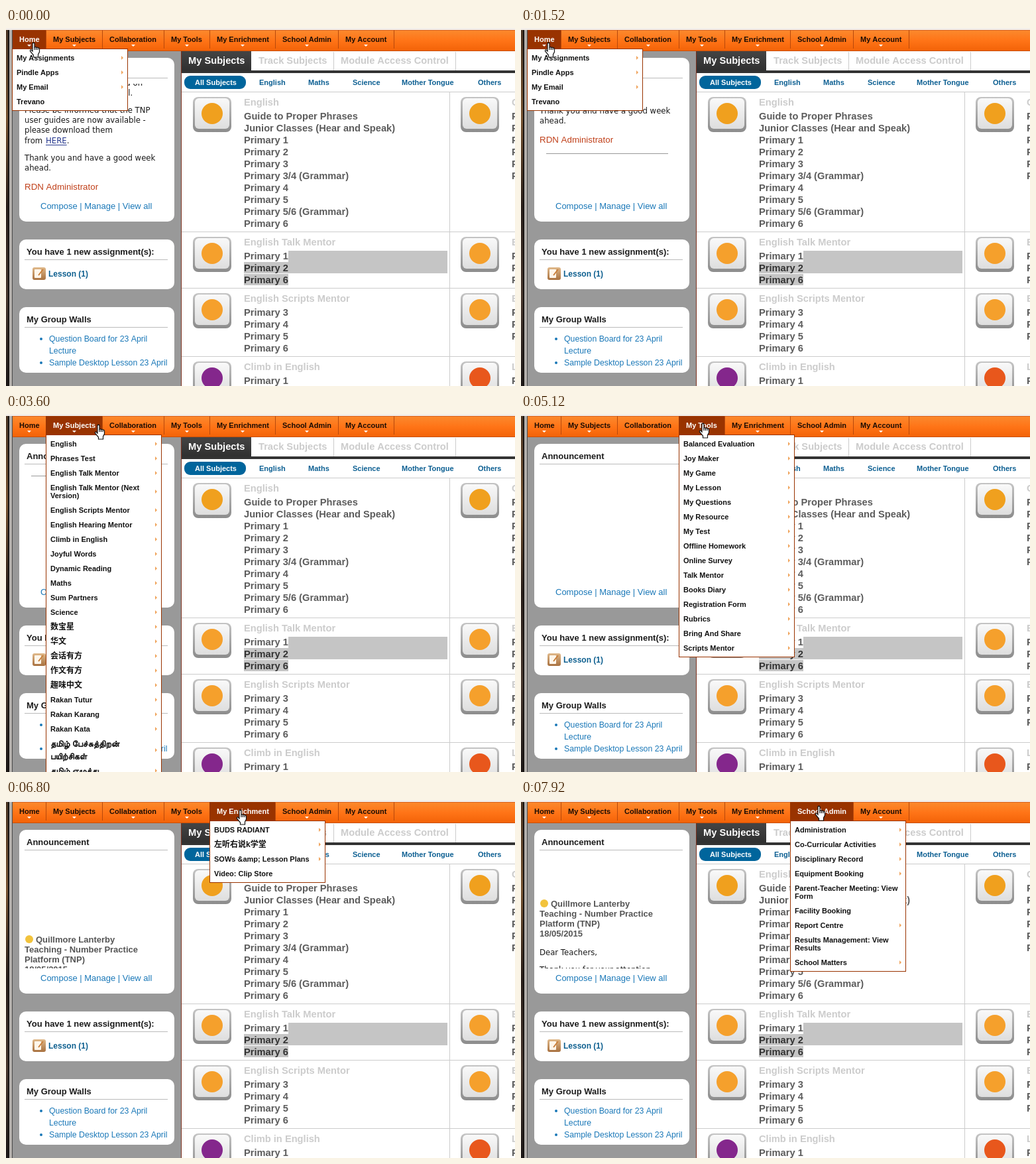
Animation, 768 px wide and 540 px high, one loop 8000 ms. Source, as an HTML page with a canvas:

```html
<!DOCTYPE html>
<html lang="en">
<head>
<meta charset="utf-8">
<title>School portal menus</title>
<style>
html, body { margin: 0; width: 100%; height: 100%; overflow: hidden; background: #fff; }
canvas { display: block; }
</style>
</head>
<body>
<canvas id="stage" width="768" height="540"></canvas>
<script>
const ctx = document.getElementById('stage').getContext('2d');
const SANS = '"Liberation Sans", Arial, "Noto Sans CJK SC", "Noto Sans CJK", sans-serif';
const WIDE = '"DejaVu Sans", Verdana, sans-serif';
const STEP = 80, FRAMES = 100;
const BROWN = '#993300', LINK = '#1a78b8';

// A trailing ">" marks an entry with a submenu, "\n" a wrapped label.
const nav = [
  { x: 10, label: 'Home', items: ['My Assignments>', 'Pindle Apps>', 'My Email>', 'Trevano'] },
  { x: 60, label: 'My Subjects', items: ['English>', 'Phrases Test>', 'English Talk Mentor>',
    'English Talk Mentor (Next\nVersion)>', 'English Scripts Mentor>', 'English Hearing Mentor>',
    'Climb in English>', 'Joyful Words>', 'Dynamic Reading>', 'Maths>', 'Sum Partners>', 'Science>',
    '数宝星>', '华文>', '会话有方>', '作文有方>', '趣味中文>', 'Rakan Tutur>', 'Rakan Karang>',
    'Rakan Kata>', 'தமிழ் பேச்சுத்திறன்\nபயிற்சிகள்>', 'தமிழ் எழுத்து>'] },
  { x: 145, label: 'Collaboration', items: ['Discussion Forum>', 'Group Walls>', 'Messages>', 'Shared Files'] },
  { x: 238, label: 'My Tools', items: ['Balanced Evaluation>', 'Joy Maker>', 'My Game>', 'My Lesson>',
    'My Questions>', 'My Resource>', 'My Test>', 'Offline Homework>', 'Online Survey>', 'Talk Mentor>',
    'Books Diary>', 'Registration Form>', 'Rubrics>', 'Bring And Share>', 'Scripts Mentor>'] },
  { x: 307, label: 'My Enrichment', items: ['BUDS RADIANT>', '左听右说k学堂>', 'SOWs &amp; Lesson Plans>',
    'Video: Clip Store'] },
  { x: 406, label: 'School Admin', items: ['Administration>', 'Co-Curricular Activities>',
    'Disciplinary Record>', 'Equipment Booking>', 'Parent-Teacher Meeting: View\nForm', 'Facility Booking',
    'Report Centre>', 'Results Management: View\nResults', 'School Matters>'] },
  { x: 501, label: 'My Account', items: [] },
  { x: 585 }
];

const primary = (...levels) => levels.map(n => 'Primary ' + n);
const rows = [
  { y: 97, title: 'English', side: 'C', marks: ['#f0a01e', '#f0a01e'],
    items: ['Guide to Proper Phrases', 'Junior Classes (Hear and Speak)',
      ...primary(1, 2, 3, '3/4 (Grammar)', 4, 5, '5/6 (Grammar)', 6)], more: 6 },
  { y: 308, title: 'English Talk Mentor', side: 'E', marks: ['#f5a02c', '#f5a02c'], items: primary(1, 2, 6), more: 3 },
  { y: 393, title: 'English Scripts Mentor', side: 'E', marks: ['#f5a02c', '#f5a02c'], items: primary(3, 4, 5, 6), more: 3 },
  { y: 496, title: 'Climb in English', side: 'L', marks: ['#84278c', '#e8571c'], items: primary(1), more: 1 }
];

// Announcement lines: offset from the heading, text, style.
const notice = [
  [15, 'Teaching - Number Practice', 'head'], [30, 'Platform (TNP)', 'head'], [45, '18/05/2015', 'head'],
  [74, 'Dear Teachers,'], [100, 'Thank you for your attention'],
  [115, 'to our training session held on'], [130, 'Monday, 18 May at the hall.'],
  [156, 'Please be informed that the TNP'], [171, 'user guides are now available -'],
  [186, 'please download them'], [201.5, 'from '],
  [228, 'Thank you and have a good week'], [243, 'ahead.'], [271, 'RDN Administrator', 'sign']
];

// Keyframes: frame, values...
const scrollKeys = [[0, -32], [10, -70], [29, -140], [50, -218], [51, 264], [71, 264], [85, 210], [99, 156]];
const cursorKeys = [[0, 40, 22], [26, 40, 22], [29, 58, 20], [33, 78, 20], [44, 128, 17], [45, 138, 16],
  [49, 186, 17], [56, 186, 17], [64, 273, 14], [71, 273, 14], [81, 342, 15], [85, 352, 15],
  [92, 420, 13], [99, 448, 9]];

function track(keys, f) {
  let i = 0;
  while (i < keys.length - 2 && f >= keys[i + 1][0]) i++;
  const a = keys[i], b = keys[i + 1], k = (f - a[0]) / (b[0] - a[0]);
  return a.slice(1).map((v, n) => v + (b[n + 1] - v) * k);
}

function rect(x, y, w, h, fill, r = 0) {
  ctx.fillStyle = fill;
  ctx.beginPath();
  ctx.roundRect(x, y, w, h, r);
  ctx.fill();
}

function disc(x, y, r, fill) {
  rect(x - r, y - r, 2 * r, 2 * r, fill, r);
}

// y is the middle of the capitals.
function text(s, x, y, size, color, weight = 'bold', family = SANS) {
  ctx.font = `${weight} ${size}px ${family}`;
  ctx.fillStyle = color;
  ctx.fillText(s, x, Math.round(y + size * 0.36));
}

function shade(y0, y1, ...colors) {
  const g = ctx.createLinearGradient(0, y0, 0, y1);
  colors.forEach((c, i) => g.addColorStop(i / (colors.length - 1), c));
  return g;
}

function triangle(fill, ...p) {
  ctx.fillStyle = fill;
  ctx.beginPath();
  for (let i = 0; i < 6; i += 2) ctx.lineTo(p[i], p[i + 1]);
  ctx.fill();
}

function tile(x, y, mark) {
  rect(x, y, 58, 53, shade(y, y + 53, '#c4c4c4', '#8c8c8c'), 8);
  rect(x + 3, y + 2, 52, 46, shade(y, y + 48, '#fafafa', '#dedede'), 6);
  disc(x + 29, y + 25, 16, mark);
}

function drawContent() {
  rect(265, 35, 503, 505, '#fff');
  rect(265, 35, 105, 32, shade(35, 67, '#444', '#2e2e2e'));
  rect(265, 64, 503, 4, '#333');
  rect(494, 36, 1, 28, '#ccc');
  rect(678, 36, 1, 28, '#ccc');
  text('My Subjects', 275, 49, 14.67, '#fff');
  text('Track Subjects', 381, 49, 14.67, '#ccc');
  text('Module Access Control', 505, 49, 14.67, '#ccc');
  rect(269, 72, 93, 20, '#00659c', 9);
  text('All Subjects', 285, 82, 11, '#fff');
  [['English', 382], ['Maths', 456], ['Science', 523], ['Mother Tongue', 597], ['Others', 712]]
    .forEach(([s, x]) => text(s, x, 82, 11, '#0c5f92'));

  rect(669, 97, 1, 443, '#ccc');
  rect(426, 336, 240, 34, '#c5c5c5');
  rect(359, 353, 67, 17, '#c5c5c5');
  rect(359, 371, 67, 17, '#c5c5c5');
  rows.forEach((row, r) => {
    const { y } = row;
    rect(265, y - 1, 503, 1, '#ccc');
    tile(282, y + 7, row.marks[0]);
    tile(686, y + 7, row.marks[1]);
    text(row.title, 359, y + 15, 14.67, '#ccc');
    text(row.side, 763, y + 15, 14.67, '#ccc');
    row.items.forEach((s, i) => {
      const selected = r === 1 && i > 0;
      text(s, 359, y + 36 + 18 * i, 14.67, selected ? '#333' : '#5c5c5c');
      if (i < row.more) text('Primary', 763, y + 36 + 18 * i, 14.67, '#5c5c5c');
    });
  });
}

function card(y, h, title) {
  rect(20, y, 234, h, '#fff', 10);
  text(title, 31, y + 18, 13, '#1c1c1c');
  rect(28, y + 30, 216, 1, '#bbb');
}

function drawNotice(top) {
  ctx.save();
  ctx.beginPath();
  ctx.rect(20, 84, 234, 170);
  ctx.clip();
  disc(35, top, 6, '#f2c33c');
  text('Quillmore Lanterby', 45, top, 13, '#555');
  for (const [dy, s, style] of notice) {
    const y = top + dy;
    if (style === 'head') text(s, 28, y, 13, '#555');
    else if (style === 'sign') text(s, 28, y, 13.33, '#c0401a', 'normal');
    else text(s, 28, y, 11.7, '#1a1a1a', 'normal', WIDE);
    if (s === 'from ') {
      text('HERE', 60, y, 11.7, '#22348c', 'normal', WIDE);
      const w = ctx.measureText('HERE').width;
      rect(60, Math.round(y + 6), w, 1, '#22348c');
      text('.', 60 + w, y, 11.7, '#1a1a1a', 'normal', WIDE);
    }
  }
  rect(38, Math.round(top + 292), 184, 1, '#999');
  ctx.restore();
}

function drawSidebar(top) {
  rect(0, 0, 3, 540, shade(0, 540, '#4a3524', '#7a5634', '#2a1f1a', '#4b3a30', '#1c1716'));
  rect(3, 0, 2, 540, '#1a1614');
  rect(5, 0, 4, 540, '#b4b0ac');
  rect(9, 3, 1, 537, '#4a4a4a');
  rect(10, 35, 254, 505, '#999');
  rect(264, 35, 1, 505, '#7a2f1c');

  card(45, 247, 'Announcement');
  drawNotice(top);
  text('Compose | Manage | View all', 52, 268, 13, LINK, 'normal');

  card(319, 75, 'You have 1 new assignment(s):');
  rect(40, 361, 20, 19, shade(361, 380, '#e0b98a', '#a8713f'), 3);
  rect(43, 364, 10, 13, '#fff6ea', 1);
  ctx.strokeStyle = '#c9803c';
  ctx.lineWidth = 2;
  ctx.beginPath();
  ctx.moveTo(49, 373);
  ctx.lineTo(56, 364);
  ctx.stroke();
  text('Lesson (1)', 64, 371, 12, '#0d5f8f');

  card(421, 99, 'My Group Walls');
  disc(53, 469, 2, LINK);
  disc(53, 505, 2, LINK);
  ['Question Board for 23 April', 'Lecture', 'Sample Desktop Lesson 23 April']
    .forEach((s, i) => text(s, 65, 469 + 18 * i, 12.3, LINK, 'normal'));
}

function drawNav(open) {
  rect(0, 0, 768, 3, '#f3eee9');
  rect(10, 3, 758, 32, shade(3, 35, '#fb8a2e', '#ff7417', '#f26207'));
  rect(10, 3, 758, 1, '#d9601a');
  rect(10, 34, 758, 1, '#c9500a');
  nav.forEach(({ x, label }, i) => {
    if (i) rect(x, 3, 1, 28, '#b8490c');
    if (!label) return;
    const end = nav[i + 1].x, mid = Math.round((x + end) / 2);
    if (i === open) rect(x, 3, end - x + 1, 29, BROWN);
    text(label, x + (i ? 11 : 10), 17, 11, i === open ? '#fff' : '#1a0c04');
    triangle('#fff', mid - 3, 25, mid + 3, 25, mid, 28);
  });
}

function drawMenu({ x, items }) {
  const left = x === 10 ? 9 : x;
  const list = [];
  let y = 45;
  for (const item of items) {
    const tamil = /^[\u0b80-\u0bff]/.test(item);
    const lines = item.replace('>', '').split('\n');
    const gap = tamil ? 19 : 12;
    list.push({ lines, gap, y, size: tamil ? 13 : item.charCodeAt(0) > 255 ? 12 : 11, more: item.endsWith('>') });
    y += 22 + gap * (lines.length - 1);
  }
  const h = y - 22 + 14 - 31;
  rect(left, 31, 175, h, BROWN);
  rect(left + 1, 32, 173, h - 2, '#fff');
  for (const { lines, gap, y, size, more } of list) {
    lines.forEach((s, i) => text(s, left + 7, y + gap * i, size, '#111'));
    const mid = Math.round(y + gap * (lines.length - 1) / 2);
    if (more) triangle('#f0a45c', left + 165, mid - 3, left + 168, mid, left + 165, mid + 3);
  }
}

const hand = new Path2D('M4 1Q5.5-.5 7 1V7Q8.5 6 9.5 7.5Q11 6.5 12 8Q14 7.5 14.5 9.5V14L12.5 18V22H5.5V19L.5 13Q0 10.5 2 11L4 13Z');
const knuckles = new Path2D('M7 7V11M9.5 8V11M12 8.5V11');

function drawCursor(x, y) {
  ctx.save();
  ctx.translate(Math.round(x) - 4, Math.round(y));
  ctx.fillStyle = '#fff';
  ctx.strokeStyle = '#111';
  ctx.lineWidth = 1.2;
  ctx.fill(hand);
  ctx.stroke(hand);
  ctx.stroke(knuckles);
  ctx.restore();
}

function draw(now) {
  const f = Math.floor(now / STEP) % FRAMES;
  const [x, y] = track(cursorKeys, f);
  const [top] = track(scrollKeys, f);
  const open = nav.findIndex((n, i) => x >= n.x && x < nav[i + 1].x);
  drawContent();
  drawSidebar(Math.round(top));
  drawNav(open);
  drawMenu(nav[open]);
  drawCursor(x, y);
  requestAnimationFrame(draw);
}
requestAnimationFrame(draw);
</script>
</body>
</html>
```
